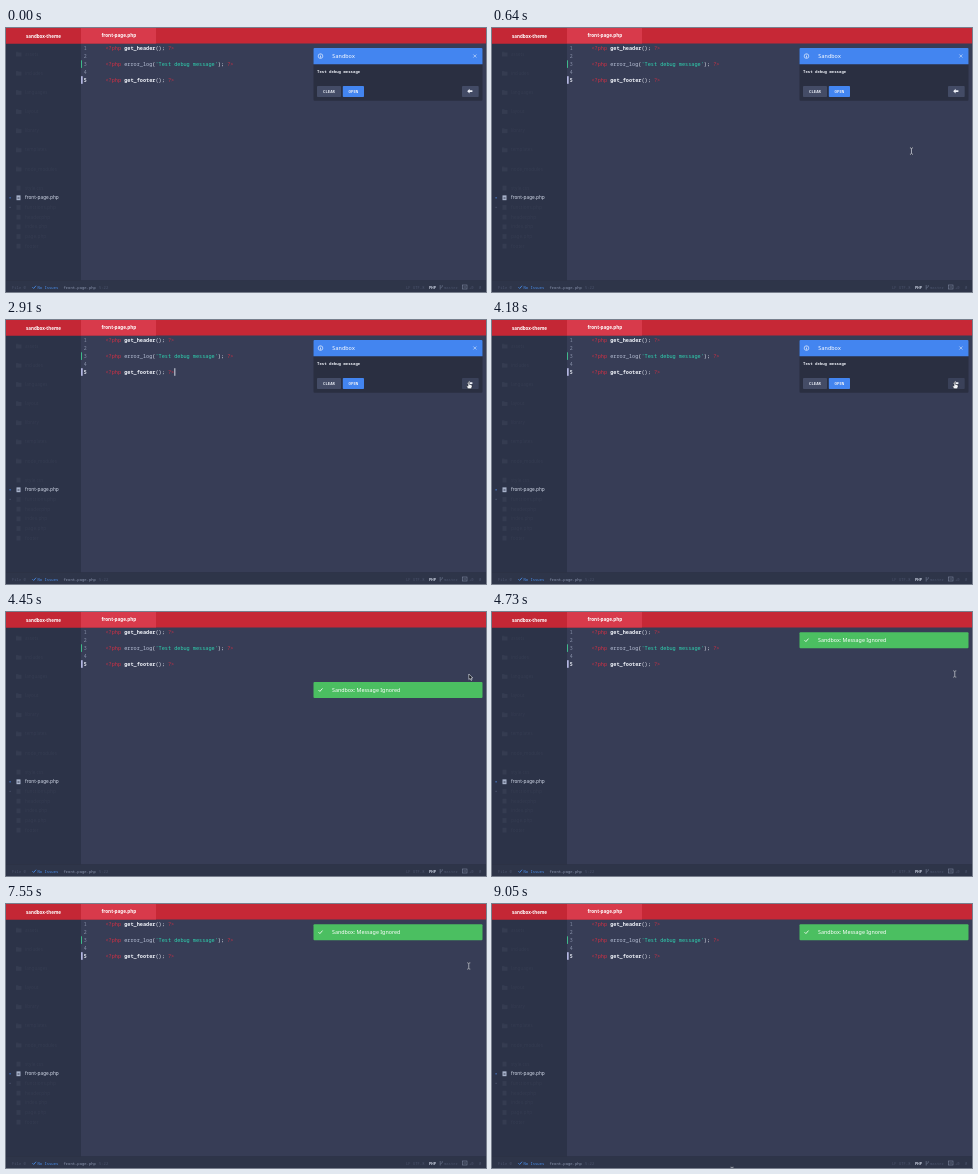
Write an HTML page with a canvas that moves like this. It is 480 px wide and 264 px high and loops after 9100 ms.

```html
<!DOCTYPE html>
<html lang="en">
<head>
<meta charset="utf-8">
<title>Editor notification</title>
<style>
html, body { margin: 0; width: 100%; height: 100%; overflow: hidden; background: #373d56; }
canvas { display: block; width: 480px; height: 264px; }
</style>
</head>
<body>
<canvas id="stage"></canvas>
<script>
const W = 480, H = 264, LOOP = 9100;
const SANS = '"Noto Sans", sans-serif';
const MONO = '"Noto Sans Mono", monospace';
const canvas = document.getElementById('stage');
const ctx = canvas.getContext('2d');
const dpr = window.devicePixelRatio || 1;
canvas.width = W * dpr;
canvas.height = H * dpr;

const clamp = v => Math.max(0, Math.min(1, v));
const progress = (t, start, length) => clamp((t - start) / length);
const mix = (a, b, p) => a + (b - a) * p;
const smooth = p => p * p * (3 - 2 * p);

// CSS-style cubic bezier, solved by bisection
function bezier(x1, y1, x2, y2) {
  const at = (a, b, s) => 3 * a * s * (1 - s) ** 2 + 3 * b * s * s * (1 - s) + s ** 3;
  return x => {
    let lo = 0, hi = 1;
    for (let i = 0; i < 24; i++) {
      const mid = (lo + hi) / 2;
      if (at(x1, x2, mid) < x) lo = mid; else hi = mid;
    }
    return at(y1, y2, lo);
  };
}
const easeHide = bezier(.34, .07, 1, .2);
const easeShrink = bezier(.5, 0, 0, 1);
const easeShow = bezier(.175, .885, .32, 1.275);

function rect(x, y, w, h, color) {
  ctx.fillStyle = color;
  ctx.fillRect(x, y, w, h);
}

function rounded(x, y, w, h, r, color) {
  ctx.fillStyle = color;
  ctx.beginPath();
  ctx.roundRect(x, y, w, h, r);
  ctx.fill();
}

// Set at ten times the size and scaled down, for unrounded advances
function text(str, x, y, size, color, font = SANS, weight = 400) {
  ctx.save();
  ctx.translate(x, y);
  ctx.scale(.1, .1);
  ctx.font = `${weight} ${size * 10}px ${font}`;
  ctx.fillStyle = color;
  ctx.textBaseline = 'alphabetic';
  ctx.fillText(str, 0, 0);
  ctx.restore();
}

function line(points, color, width) {
  ctx.strokeStyle = color;
  ctx.lineWidth = width;
  ctx.beginPath();
  points.forEach(([x, y], i) => i ? ctx.lineTo(x, y) : ctx.moveTo(x, y));
  ctx.stroke();
}

function shape(points, fill, stroke, width) {
  ctx.beginPath();
  points.forEach(([x, y], i) => i ? ctx.lineTo(x, y) : ctx.moveTo(x, y));
  ctx.closePath();
  ctx.fillStyle = fill;
  ctx.fill();
  if (!stroke) return;
  ctx.strokeStyle = stroke;
  ctx.lineWidth = width;
  ctx.lineJoin = 'round';
  ctx.stroke();
}

const check = (x, y, s, color) =>
  line([[x - s, y], [x - s * .3, y + s * .7], [x + s, y - s * .8]], color, s * .45);

const folders = ['assets', 'includes', 'languages', 'layout', 'library', 'templates', 'node_modules'];
const files = ['style.css', 'front-page.php', 'functions.php', 'header.php', 'index.php', 'page.php', 'footer'];

function drawSidebar() {
  const dim = '#353c51';
  rect(0, 15, 75, 238, '#2c3348');
  folders.forEach((name, i) => {
    const y = 26 + i * 19.15;
    rect(10, y - 2.2, 2.5, 1, dim);
    rect(10, y - 1.5, 5.5, 4, dim);
    text(name, 19, y + 1.7, 4.6, dim);
  });
  files.forEach((name, i) => {
    const y = 160 + i * 9.68;
    const active = i === 1;
    const color = active ? '#d3daea' : dim;
    rect(10.5, y - 2.3, 4, 4.8, active ? '#a9b4cc' : dim);
    if (active) {
      rect(11.5, y - .7, 2, .5, '#2c3348');
      rect(11.5, y + .6, 2, .5, '#2c3348');
    }
    text(name, 19, y + 1.7, 4.75, color);
  });
  rect(3.5, 169.2, 1.2, 1.2, '#4b83d6');
  rect(3.5, 178.8, 1.2, 1.2, '#4a526b');
}

function drawTitle() {
  rect(0, 0, W, 15.5, '#c62836');
  rect(0, 0, 75, 15.5, '#c42735');
  rect(75, 0, 75, 15.5, '#d83a4b');
  text('sandbox-theme', 20, 9.7, 4.5, '#ffffff', SANS, 600);
  text('front-page.php', 95.5, 9.3, 4.6, '#ffffff', SANS, 600);
}

const RED = '#d02f43', WHITE = '#f0f3fa', STRING = '#2ed3b0';
const code = [
  [['<?php ', RED], ['get_header', WHITE, 700], ['(); ', WHITE], ['?>', RED]],
  [],
  [['<?php ', RED], ['error_log', '#b9c2d8'], ['(', WHITE], ["'Test debug message'", STRING],
    ['); ', WHITE], ['?>', RED]],
  [],
  [['<?php ', RED], ['get_footer', WHITE, 700], ['(); ', WHITE], ['?>', RED]]
];

function drawCode(t) {
  const advance = 3.12;
  code.forEach((parts, i) => {
    const y = 20.2 + i * 7.95;
    const current = i === 4;
    text(String(i + 1), 77.8, y + 1.8, 5, current ? '#e4e8f2' : '#8790a8', MONO, current ? 700 : 400);
    let x = 99.5;
    for (const [str, color, weight] of parts) {
      text(str, x, y + 1.8, 5.2, color, MONO, weight || 500);
      x += str.length * advance;
    }
  });
  rect(75, 32.3, 1, 7.6, '#3fb98a');
  rect(75, 48.2, 1.7, 7.6, '#b3b6e0');
  const blink = t % 800;
  if (t < 4280 && blink > 185 && blink < 555) rect(168.4, 48.2, .9, 7.6, '#e6e9f2');
}

function drawStatus() {
  const dim = '#4b536c', y = 260.7;
  rect(0, 252.5, W, 11.5, '#2e3549');
  rect(0, 252.2, W, .5, '#2a3043');
  text('File 0', 6, y, 3.85, dim, MONO);
  check(28.2, 259.2, 1.8, '#4a90f0');
  text('No Issues', 31.5, y, 3.85, '#4a90f0', MONO, 500);
  text('front-page.php', 57.5, y, 3.85, '#8d97b1', MONO);
  text('5:22', 93, y, 3.85, dim, MONO);
  text('LF UTF-8', 400, y, 3.85, dim, MONO);
  text('PHP', 423, y, 3.9, '#c9d0e0', MONO, 600);
  line([[434.2, 257], [434.2, 261.5]], '#6b748d', .7);
  line([[436.3, 257.2], [436.3, 258.6], [434.4, 260]], '#6b748d', .7);
  text('master', 438, y, 3.85, dim, MONO);
  ctx.strokeStyle = '#7a839c';
  ctx.lineWidth = .6;
  ctx.strokeRect(456.5, 257, 4.5, 4);
  line([[457.5, 259], [460, 259]], '#7a839c', .6);
  text('+0', 463, y, 3.85, dim, MONO);
  text('0', 473, y, 3.85, dim, MONO);
}

function button(x, w, label, labelX, color) {
  rounded(x, 58, w, 11, .8, color);
  text(label, labelX, 64.9, 4, '#e8ecf5', MONO, 600);
}

function drawPanel(t) {
  const p = easeHide(progress(t, 4280, 120));
  if (p >= 1) return;
  ctx.save();
  ctx.globalAlpha = 1 - p;
  ctx.translate(392, 46.5);
  ctx.scale(1 - .2 * p, 1 - .2 * p);
  ctx.translate(-392, -46.5);
  rounded(307.5, 20, 169, 52.8, 1, '#2a2f41');
  rounded(307.5, 20, 169, 16.3, [1, 1, 0, 0], '#4385f0');
  ctx.strokeStyle = '#e6eefc';
  ctx.lineWidth = .7;
  ctx.beginPath();
  ctx.arc(314.5, 28.1, 2.3, 0, Math.PI * 2);
  ctx.stroke();
  rect(314.1, 26.7, .8, .7, '#e6eefc');
  rect(314.1, 27.9, .8, 1.8, '#e6eefc');
  text('Sandbox', 326, 30.2, 5.5, '#ffffff', MONO, 500);
  line([[467.4, 26.5], [470.4, 29.5]], '#c7dbfb', .7);
  line([[470.4, 26.5], [467.4, 29.5]], '#c7dbfb', .7);
  text('Test debug message', 311, 44.8, 4, '#eef1f8', MONO, 600);
  button(311, 24, 'CLEAR', 317, '#444c66');
  button(336.8, 21.2, 'OPEN', 342.6, '#4385f0');
  rounded(456, 58, 16.7, 11, .8, t > 1750 ? '#3a4159' : '#434b65');
  shape([[461.2, 63.2], [463.6, 60.8], [463.6, 62.3], [466.4, 62.3], [466.4, 64.1],
    [463.6, 64.1], [463.6, 65.6]], '#eef1f8');
  ctx.restore();
}

function drawToast(t) {
  if (t < 4280) return;
  const show = easeShow(progress(t, 4280, 160));
  const y = mix(77.2, 20.2, easeShrink(progress(t, 4400, 240)));
  ctx.save();
  ctx.globalAlpha = clamp(show);
  ctx.translate(0, y + 8 - 10 * (1 - show));
  ctx.scale(1, Math.max(.02, show));
  rounded(307.5, -8, 169, 16, 1, '#4bbf61');
  check(314.5, 0, 2, '#ecfaee');
  text('Sandbox: Message Ignored', 326, 2, 5.35, '#ffffff', SANS, 500);
  ctx.restore();
}

// Pointer stops: time, x, y
const path = [
  [60, 240, 270], [900, 472, 80], [1020, 470, 78], [1360, 466.3, 69],
  [1720, 462.8, 62], [7720, 462.8, 62], [8560, 240, 265], [9080, 240, 266.3]
];

function pointerAt(t) {
  const i = path.findIndex(stop => stop[0] > t);
  if (i < 1) return null;
  const [t0, x0, y0] = path[i - 1], [t1, x1, y1] = path[i];
  const p = smooth((t - t0) / (t1 - t0));
  return [mix(x0, x1, p), mix(y0, y1, p)];
}

function drawBeam() {
  const beam = (color, width) => {
    line([[0, -2.6], [0, 2.6]], color, width);
    line([[-1.5, -3.1], [-.5, -3.1], [0, -2.6], [.5, -3.1], [1.5, -3.1]], color, width);
    line([[-1.5, 3.1], [-.5, 3.1], [0, 2.6], [.5, 3.1], [1.5, 3.1]], color, width);
  };
  beam('rgba(20,24,36,.5)', 1.5);
  beam('#d5d9e4', .8);
}

function drawArrow() {
  shape([[0, 0], [0, 5.5], [1.3, 4.4], [2.2, 6.4], [3.2, 6], [2.3, 4], [4, 4]],
    '#11141c', '#e9ecf3', .6);
}

function drawHand() {
  shape([[-.8, -.2], [.4, -.2], [.5, 2.3], [3, 2.8], [3.3, 4.5], [2.5, 6.8],
    [-.8, 6.8], [-2.4, 4.2], [-1.7, 3.6], [-.8, 4.3]], '#f5f7fb', '#11141c', .5);
}

function drawPointer(t) {
  const at = pointerAt(t);
  if (!at) return;
  ctx.save();
  ctx.translate(...at);
  if (t > 4650 || at[1] > 72) drawBeam();
  else if (t > 4400 || at[1] > 68) drawArrow();
  else drawHand();
  ctx.restore();
}

function draw(now) {
  const t = (now - start) % LOOP;
  ctx.setTransform(dpr, 0, 0, dpr, 0, 0);
  rect(0, 0, W, H, '#373d56');
  drawSidebar();
  drawTitle();
  drawCode(t);
  drawStatus();
  drawPanel(t);
  drawToast(t);
  drawPointer(t);
}

const start = performance.now();
function frame() {
  draw(performance.now());
  requestAnimationFrame(frame);
}
frame();
</script>
</body>
</html>
```
